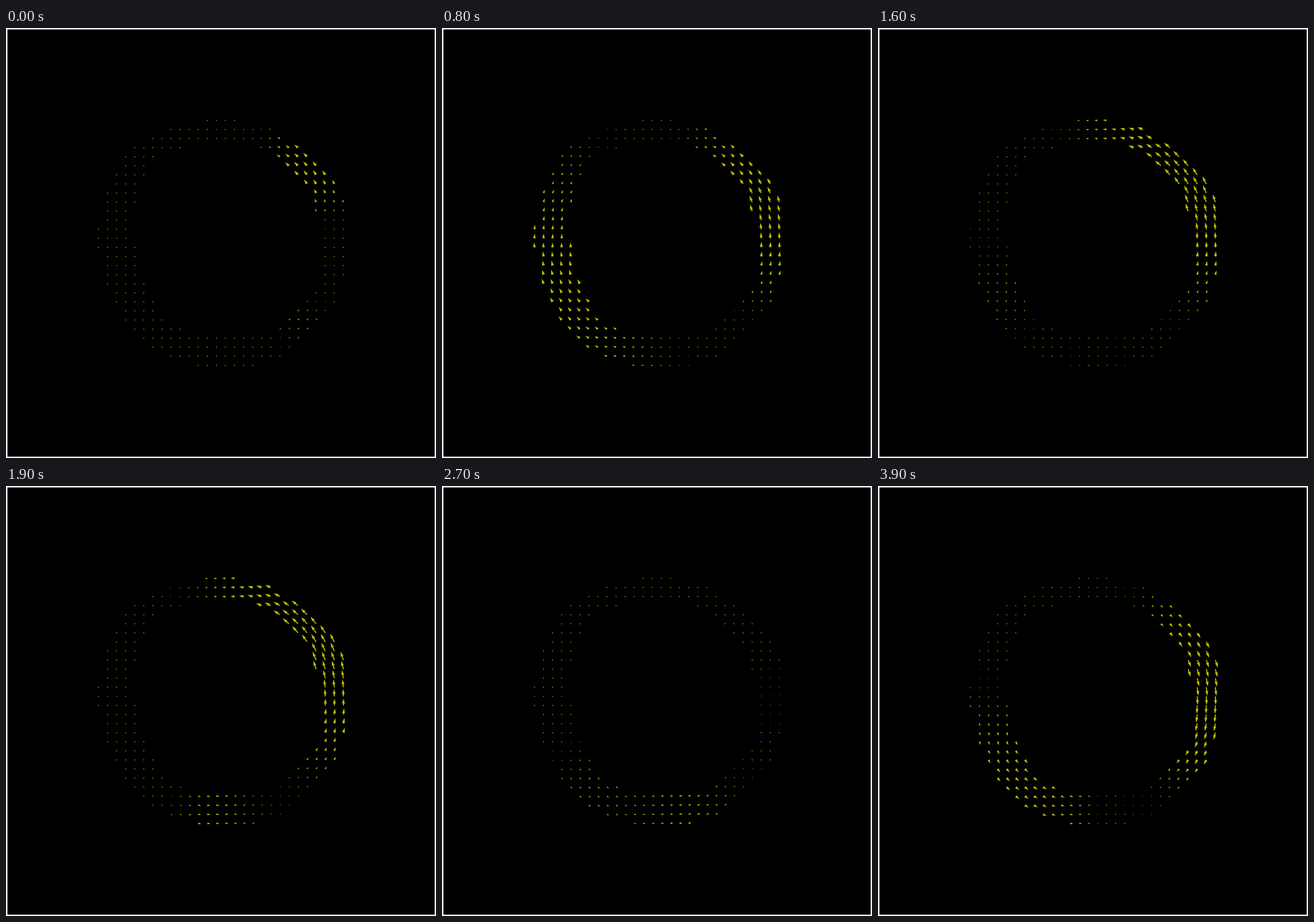
An HTML page with a canvas that plays this animation: 748 by 748 pixels, repeating every 4 s.

```html
<!DOCTYPE html>
<html lang="en">
<head>
<meta charset="utf-8">
<title>Ring flow field</title>
<style>
  html, body { margin: 0; width: 748px; height: 748px; overflow: hidden; background: #fff; }
  canvas { display: block; }
</style>
</head>
<body>
<canvas id="stage" width="748" height="748"></canvas>
<script>
const ctx = document.getElementById('stage').getContext('2d');
const LOOP = 4000, STEP = 100, CENTER = 374, SHAFT = 1.78;
const GRID_START = 160.8, GRID_STEP = 15.78, GRID_SIZE = 28;

// Radii of the ring's rims, every 20 degrees counterclockwise from the right
const OUTER = [221, 227, 219, 215.6, 216.4, 216, 219.5, 226.8, 216.5, 215, 212, 215, 219, 218, 220, 223, 220, 223.9];
const INNER = [174, 172, 177, 177, 177, 174.5, 183.3, 178.5, 161, 150.4, 147, 152, 164, 163, 163, 176, 174, 182];

// Waves running along the ring: [time, angle, spread, counterclockwise speed]
const WAVES = [
  [ // right
    [0, 40, 25, 10], [800, 20, 50, 12], [1200, 35, 52, 13.5], [1900, 30, 58, 16],
    [2300, 0, 40, 11.5], [3200, 8, 42, -10], [3900, 5, 48, -15],
  ],
  [ // left
    [0, 230, 30, 1], [800, 200, 72, -9], [1200, 222, 45, -7.5], [1900, 200, 40, -1],
    [2300, 225, 35, 1.5], [3200, 237, 20, 7], [3900, 228, 52, 8],
  ],
  [ // bottom
    [0, 315, 18, 4], [800, 300, 20, 0], [1200, 265, 25, 0], [1900, 265, 25, 5.5],
    [2300, 285, 42, 10.5], [3200, 285, 20, -1.5], [3900, 285, 14, -3],
  ],
];

const lerp = (a, b, k) => a + (b - a) * k;

function rimRadius(rim, angle) {
  const i = Math.floor(angle / 20) % 18;
  return lerp(rim[i], rim[(i + 1) % 18], angle / 20 % 1);
}

const points = [];
for (let row = 0; row < GRID_SIZE; row++) {
  for (let col = 0; col < GRID_SIZE; col++) {
    const x = GRID_START + col * GRID_STEP, y = GRID_START + row * GRID_STEP;
    const dx = x - CENTER, dy = y - CENTER, r = Math.hypot(dx, dy);
    const angle = (Math.atan2(-dy, dx) * 180 / Math.PI + 360) % 360;
    if (r >= rimRadius(INNER, angle) && r <= rimRadius(OUTER, angle)) {
      points.push({ x, y, angle, ux: dy / r, uy: -dx / r });
    }
  }
}

function waveAt(keys, t) {
  const next = Math.max(1, keys.findIndex(key => key[0] >= t));
  const from = keys[next - 1], to = keys[next];
  const k = (t - from[0]) / (to[0] - from[0]);
  const [, angle, spread, speed] = from.map((value, i) => lerp(value, to[i], k));
  return { angle, spread, speed };
}

function flowAt(waves, angle) {
  return waves.reduce((sum, wave) => {
    const offset = (angle - wave.angle + 540) % 360 - 180;
    return sum + wave.speed * Math.exp(-((offset / wave.spread) ** 2));
  }, 0);
}

function polygon(p, sign, scale, corners) {
  corners.forEach(([along, across], i) => {
    const a = along * scale * sign, b = across * scale;
    ctx[i ? 'lineTo' : 'moveTo'](p.x + p.ux * a - p.uy * b, p.y + p.uy * a + p.ux * b);
  });
  ctx.closePath();
}

const HEXAGON = Array.from({ length: 6 }, (_, i) =>
  [Math.cos(i * Math.PI / 3) / 2, Math.sin(i * Math.PI / 3) / 2]);

// Arrows shorter than their head shrink as a whole; the tiniest become dots
function arrow(p, flow) {
  const length = Math.abs(flow) / SHAFT;
  if (length < 1) return polygon(p, 1, SHAFT, HEXAGON);
  const tip = Math.max(5, length);
  polygon(p, Math.sign(flow), SHAFT * Math.min(1, length / 5), [
    [0, -.5], [tip - 4.5, -.5], [tip - 5, -1.5], [tip, 0],
    [tip - 5, 1.5], [tip - 4.5, .5], [0, .5],
  ]);
}

function draw(now) {
  const t = Math.floor(now % LOOP / STEP) * STEP;
  const waves = WAVES.map(keys => waveAt(keys, t));
  ctx.fillStyle = '#fff';
  ctx.fillRect(0, 0, 748, 748);
  ctx.fillStyle = '#000';
  ctx.fillRect(2.5, 2.5, 743.2, 743.2);
  ctx.fillStyle = '#bfbf00';
  ctx.beginPath();
  for (const p of points) arrow(p, flowAt(waves, p.angle));
  ctx.fill();
}

const start = performance.now();
function loop() {
  draw(performance.now() - start);
  requestAnimationFrame(loop);
}
loop();
</script>
</body>
</html>
```
